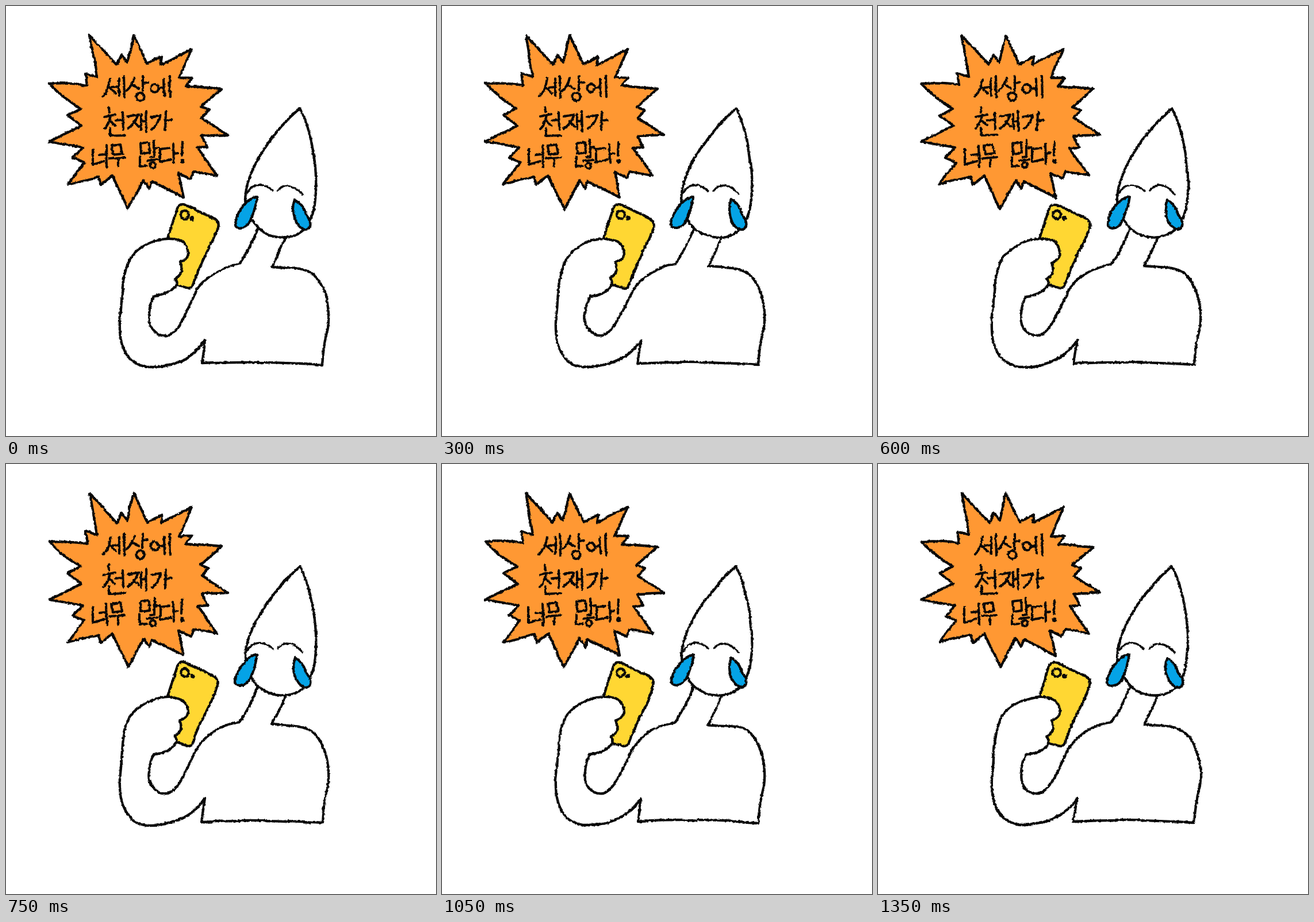
Recreate the animation shown at these times as an HTML page. Size 748 by 748 pixels, loop 1.5 s.

```html
<!DOCTYPE html>
<html lang="ko">
<head>
<meta charset="utf-8">
<style>
  html, body { margin: 0; width: 100%; height: 100%; overflow: hidden; background: #fff; }
  svg { display: block; width: 100vw; height: 100vh; }
  .ink { fill: none; stroke: #080808; stroke-width: 4.3; stroke-linecap: round; stroke-linejoin: round; }
  .white { fill: #fff; }
  .orange { fill: #ff9833; }
  .yellow { fill: #ffd733; }
  .blue { fill: #05a3e6; }
  .dot { fill: #080808; stroke: none; }
  .thin { stroke-width: 3.5; }
  .lettering { stroke-width: 4.1; }
</style>
</head>
<body>
<svg viewBox="0 0 748 748" role="img" aria-label="세상에 천재가 너무 많다!">
  <filter id="crayon" filterUnits="userSpaceOnUse" x="0" y="0" width="748" height="748" color-interpolation-filters="sRGB">
    <feTurbulence id="wobble" type="fractalNoise" baseFrequency=".025" result="slow"/>
    <feTurbulence id="grain" type="fractalNoise" baseFrequency=".25" numOctaves="2" result="fast"/>
    <feDisplacementMap in="SourceGraphic" in2="slow" scale="4" xChannelSelector="R" yChannelSelector="G"/>
    <feDisplacementMap in2="fast" scale="3.4" xChannelSelector="R" yChannelSelector="G"/>
    <feGaussianBlur stdDeviation=".4"/>
  </filter>

  <g class="ink" filter="url(#crayon)">
    <!-- speech burst -->
    <path class="orange" d="M146 51 L193 102 201 85 211 98 222 51 246 101 271 88 269 102
      323 75 301 125 324 125 313 139 375 144 338 176 353 181 341 195 386 224 340 226
      350 246 333 247 367 295 326 288 321 300 300 290 309 333 254 305 249 318 240 303
      212 353 185 295 165 311 161 297 107 310 136 272 117 264 134 246 75 236 131 208
      107 190 130 178 Q100 161 75 135 Q112 133 141 138 L138 117 158 123Z"/>

    <g class="lettering">
      <path d="M182 127 Q179 147 169 157 M180 142 L191 152 M185 142 L196 141 M197 127 L197 156 M205 122 L206 159
        M223 125 Q220 139 210 148 M220 137 L231 144 M238 122 L238 147 M238 134 L247 133
        M233 151 a7 7 0 1 0 1 0 M259 136 a7 7 0 1 0 1 0
        M268 143 L275 142 M275 127 L276 156 M285 122 L286 158"/>
      <path d="M179 176 L180 185 M171 193 L190 189 M182 191 Q179 206 170 214 M181 200 L190 208
        M191 199 L202 198 M203 185 L204 215 M180 213 L180 226 207 225
        M212 192 L230 189 Q224 206 212 213 M222 201 L231 210
        M235 188 L235 214 M235 201 L243 200 M243 183 L244 218
        M252 193 L269 190 Q265 206 254 214 M278 184 L277 216 M277 200 L288 198"/>
      <path d="M151 249 L151 276 171 270 M163 259 L174 258 M175 243 L176 280
        M184 243 L186 258 202 256 199 241Z M181 265 L206 263 M195 264 L195 279
        M234 239 L235 257 250 255 249 237Z M258 233 L258 261 M258 247 L266 246
        M233 262 L233 279 245 278 M252 263 L258 262 M246 269 L263 267
        M255 272 a5 5 0 1 0 1 0
        M284 247 L268 249 268 271 287 267 M291 240 L292 273 M292 257 L299 256
        M307 236 L306 260"/>
      <circle class="dot" cx="307" cy="270" r="4"/>
    </g>

    <!-- phone -->
    <path class="yellow" d="M281 404 L298 352 Q302 342 312 346 L361 369 Q371 375 368 386
      Q360 409 349 429 Q336 455 325 485 Q322 493 314 490 L294 484Z"/>
    <circle cx="311" cy="363" r="7"/>
    <circle class="dot" cx="324" cy="369" r="4"/>

    <!-- neck, arm and torso -->
    <path class="white" d="M438 388 Q424 422 406 449 C372 455 349 470 333 493
      C318 520 303 566 281 573 C261 576 245 559 249 535 Q250 518 257 505
      Q284 503 296 485 Q298 478 293 474 Q310 466 302 446
      Q314 443 317 432 Q316 412 300 407 C270 399 232 415 215 440
      C199 473 203 513 198 548 C196 594 212 628 252 628
      C298 628 328 609 346 581 L340 622 Q440 617 550 624
      Q552 590 560 560 C564 530 558 486 532 465 C512 453 490 456 463 453 Q475 430 487 402"/>

    <!-- head -->
    <path class="white" d="M511 178 C471 212 417 281 416 337 Q417 357 428 372
      C447 407 495 411 518 389 Q534 369 537 344 C545 292 531 213 511 178Z"/>
    <path class="thin" d="M420 325 C428 308 448 307 463 321 M473 321 C483 308 500 309 516 328"/>
    <path class="blue" d="M437 332 Q434 353 426 371 C418 390 400 388 399 380 C399 363 416 335 437 332Z"/>
    <path class="blue" d="M503 337 Q518 346 522 363 C533 377 531 388 521 389 C504 386 495 359 503 337Z"/>
  </g>
</svg>
<script>
  const STEP = 150, DRAWINGS = 10;
  const wobble = document.getElementById("wobble");
  const grain = document.getElementById("grain");
  let shown = -1;

  // Each drawing is the same picture traced with a different shake of the hand.
  function draw(now) {
    const drawing = Math.floor(now / STEP) % DRAWINGS;
    if (drawing !== shown) {
      shown = drawing;
      wobble.setAttribute("seed", drawing * 7 + 3);
      grain.setAttribute("seed", drawing * 13 + 1);
    }
    requestAnimationFrame(draw);
  }
  draw(performance.now());
</script>
</body>
</html>
```
